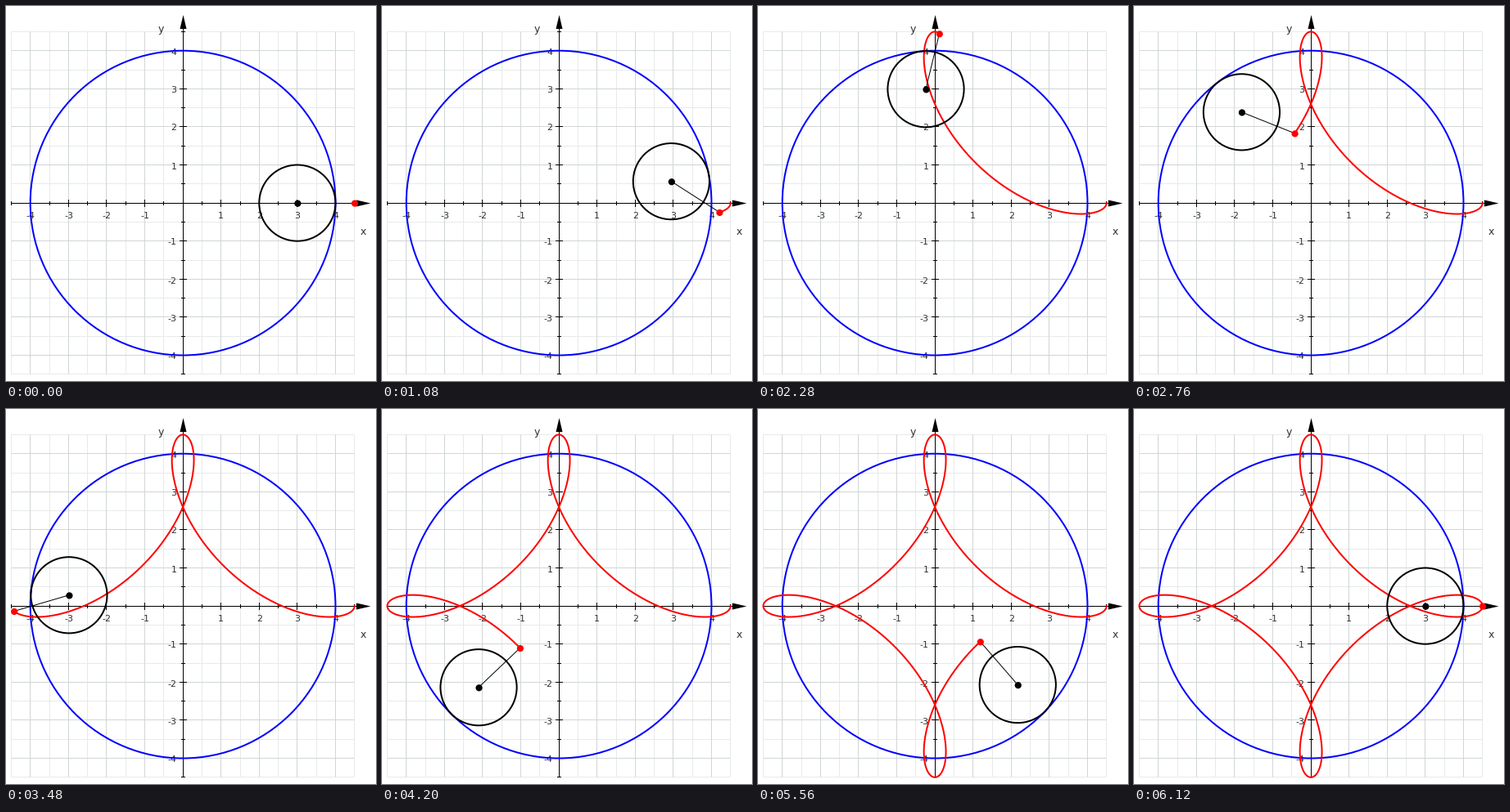
These frames come from a looping animation (452 by 459 pixels, 8.12 s). A matplotlib script:

```python
import math

import numpy as np
import matplotlib.pyplot as plt
from matplotlib.animation import FuncAnimation
from matplotlib.patches import Circle, Polygon

W, H, DPI = 452, 459, 128
OX, OY, UNIT = 216.1, 241.1, 46.6
BIG, SMALL, ARM = 4, 1, 1.5
LOOP, TICK = 8120, 40
HOLD, STEP = 1000, 80
LAST, PHASES = 65, 99
INK = "#303030"


def pt(px):
    return px * 72 / DPI


def to_px(x, y):
    return OX + UNIT * x, OY - UNIT * y


def crisp(v):
    return math.floor(v) + 0.5


fig = plt.figure(figsize=(W / DPI, H / DPI), dpi=DPI, facecolor="white")
ax = fig.add_axes([0, 0, 1, 1])
ax.set_xlim(0, W)
ax.set_ylim(H, 0)
ax.axis("off")


def seg(x0, y0, x1, y1, color, z):
    ax.plot([x0, x1], [y0, y1], color=color, lw=pt(1), zorder=z,
            solid_capstyle="butt", snap=False)


def label(x, y, s, size=11, ha="center"):
    ax.text(x, y, s, family="DejaVu Sans", fontsize=pt(size), color=INK,
            ha=ha, va="center_baseline", zorder=3)


def ring(x, y, r, color, z):
    return ax.add_patch(Circle((x, y), r * UNIT, fill=False, ec=color,
                               lw=pt(2), zorder=z))


def dot(color, z):
    return ax.add_patch(Circle((0, 0), 4.1, fc=color, lw=0, zorder=z))


# Grid and ticks at every half unit
left, top = (crisp(v) for v in to_px(-4.5, 4.5))
right, bottom = (crisp(v) for v in to_px(4.5, -4.5))
cx, cy = crisp(OX), crisp(OY)
for n in range(-9, 10):
    gx, gy = (crisp(v) for v in to_px(n / 2, n / 2))
    major = n % 2 == 0
    shade, z = ("#d0d6d6", 1) if major else ("#e8eaea", 0)
    seg(gx, top, gx, bottom, shade, z)
    seg(left, gy, right, gy, shade, z)
    if n == 0:
        continue
    size = 4.5 if major else 2.5
    seg(gx, cy - size, gx, cy + size, "black", 2)
    seg(cx - size, gy, cx + size, gy, "black", 2)
    if major:
        label(gx, 256.5, str(n // 2))
        label(208.5, gy + 1, str(n // 2), ha="right")

seg(left, cy, 430, cy, "black", 2)
seg(cx, bottom + 0.5, cx, 27, "black", 2)
for tip in ([(445.5, cy), (428, cy - 4), (428, cy + 4)],
            [(cx, 11), (cx - 4, 28), (cx + 4, 28)]):
    ax.add_patch(Polygon(tip, fc="black", lw=0, zorder=3))
label(436.5, 275, "x", 12.5)
label(189.5, 27, "y", 12.5)

ring(OX, OY, BIG, "#0000ff", 4)
trace, = ax.plot([], [], color="#ff0000", lw=pt(2), zorder=5)
wheel = ring(OX, OY, SMALL, "black", 6)
arm, = ax.plot([], [], color="black", lw=pt(1), zorder=7)
hub = dot("black", 8)
pen = dot("#ff0000", 9)


def center(t):
    gap = BIG - SMALL
    return gap * np.cos(t), gap * np.sin(t)


def curve(t):
    x, y = center(t)
    spin = (BIG - SMALL) / SMALL * t
    return x + ARM * np.cos(spin), y - ARM * np.sin(spin)


def phase(i):
    ms = i * TICK
    if ms < HOLD:
        return 0
    k = min(LAST, 1 + (ms - HOLD) // STEP)
    return PHASES if k == LAST else math.ceil(1.5 * k)


def draw(i):
    p = phase(i)
    t = 2 * math.pi * p / PHASES
    hx, hy = to_px(*center(t))
    px, py = to_px(*curve(t))
    trace.set_data(*to_px(*curve(np.linspace(0, t, 6 * p + 2))))
    wheel.center = hx, hy
    hub.center = hx + 0.5, hy + 0.6
    pen.center = px + 0.3, py + 0.5
    arm.set_data([hx, px], [hy, py])
    return trace, wheel, arm, hub, pen


anim = FuncAnimation(fig, draw, frames=LOOP // TICK, interval=TICK,
                     init_func=lambda: draw(0), repeat=True, repeat_delay=0)
plt.show()
```
